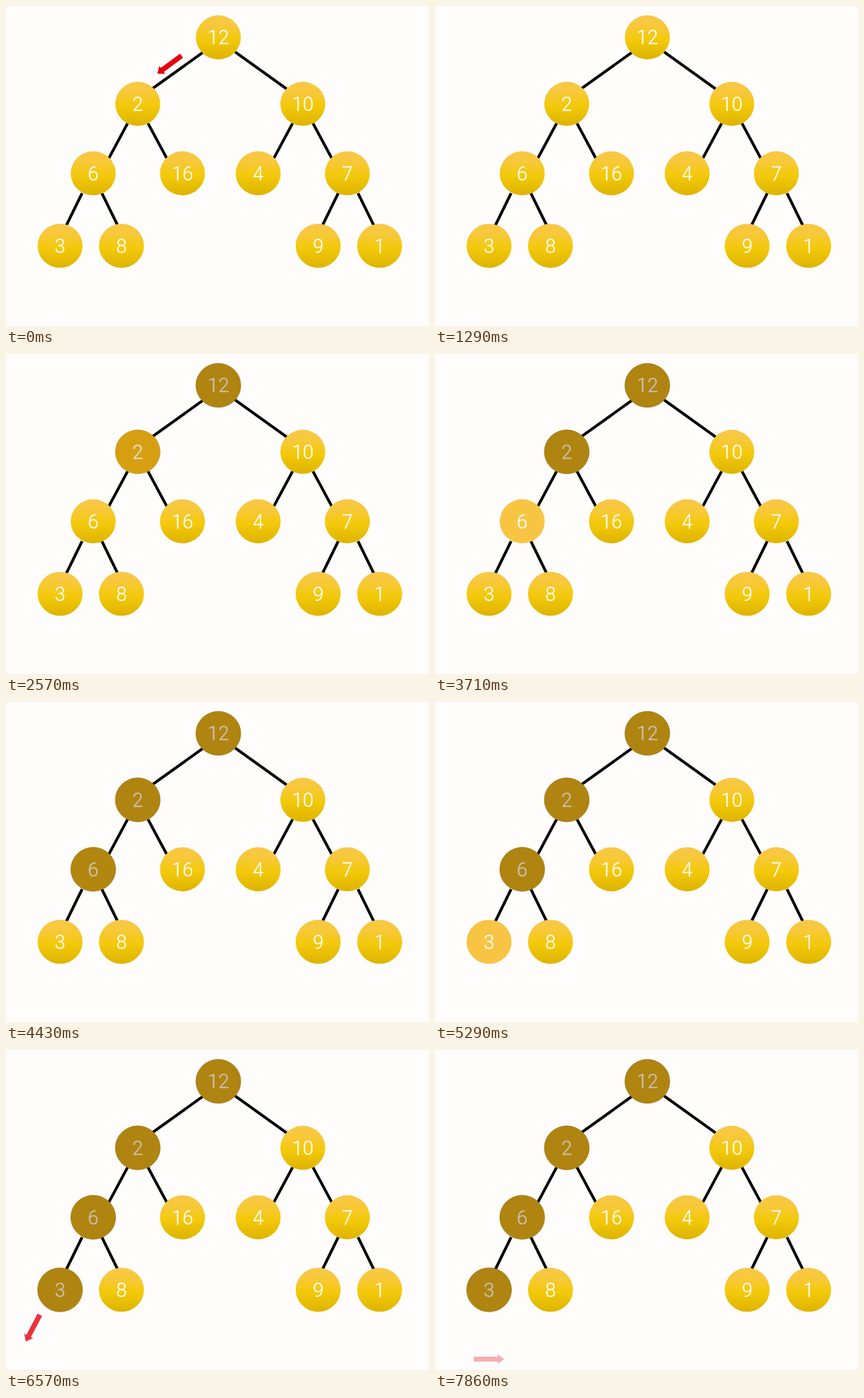
An HTML page for the animation above (8000 ms loop, 600x455 px).

```html
<!DOCTYPE html>
<html lang="en">
<head>
<meta charset="utf-8">
<title>Tree traversal</title>
<style>
  html, body { margin: 0; width: 100%; height: 100%; overflow: hidden; background: #fefdfc; }
  svg { display: block; width: 100vw; height: 100vh; }
  text { font: 300 27.5px Roboto, "Open Sans", sans-serif; text-anchor: middle; stroke-width: .3; }
  line { stroke: #000; stroke-width: 4; }
</style>
</head>
<body>
<svg viewBox="0 0 600 455">
  <defs>
    <linearGradient id="gold" x1="0" y1="0" x2="0" y2="1">
      <stop offset="0" stop-color="#f8c747"/>
      <stop offset=".25" stop-color="#f7c838"/>
      <stop offset=".55" stop-color="#f3c90a"/>
      <stop offset="1" stop-color="#deb300"/>
    </linearGradient>
  </defs>
  <g id="edges"></g>
  <g id="discs"></g>
  <g id="arrows" fill="#e6000f"></g>
</svg>
<script>
const LOOP = 8000, STEP = 1000 / 7;
const VISIT_FADE = 750, ARROW_FADE = 400;
const VISITS = [1460, 2195, 3710, 5280]; // by depth, down the left side
const DISC_KEYS = [[248, 197, 68], [214, 159, 18], [176, 132, 16]];
const TEXT_KEYS = [[255, 255, 255], [204, 198, 188]];

const node = (label, x, ...kids) => ({ label, x, kids });
const tree = node(12, 301.2,
  node(2, 186.9,
    node(6, 123.7, node(3, 76.7), node(8, 163.8)),
    node(16, 250.3)),
  node(10, 421,
    node(4, 357.7),
    node(7, 484.2, node(9, 442.8), node(1, 530))));

// Where the two edges below each level leave the parent and meet the child.
const FORKS = [
  { fromX: 22.5, fromY: 20.8, toX: 95.5, toY: 21.3 },
  { fromX: 14.5, fromY: 27.8, toX: 41, toY: 21.5 },
  { fromX: 14, fromY: 28.3, toX: 36.5, toY: 28.8 }
];

const arrows = [
  { x: 249, y: 70.6, angle: 143.2, show: -ARROW_FADE, hide: 300 },
  { x: 48, y: 376.5, angle: 117.8, show: 6250, hide: 7000 },
  { x: 55, y: 439.5, angle: 0, show: 7730, hide: LOOP }
];

const levelY = depth => 44.6 + 92.4 * depth + 2.13 * depth ** 2;
const ramp = (t, start, length) => Math.max(0, Math.min(1, (t - start) / length));

function set(el, attrs) {
  for (const key in attrs) el.setAttribute(key, attrs[key]);
}

function add(layer, tag, attrs) {
  const el = document.createElementNS('http://www.w3.org/2000/svg', tag);
  set(el, attrs);
  return document.getElementById(layer).appendChild(el);
}

function blend(keys, k) {
  const pos = k * (keys.length - 1);
  const i = Math.min(Math.floor(pos), keys.length - 2);
  return `rgb(${keys[i].map((v, c) => Math.round(v + (keys[i + 1][c] - v) * (pos - i)))})`;
}

const visited = [];

function build({ label, x, kids }, depth, onPath) {
  const y = levelY(depth);
  if (kids.length) {
    const [left, right] = kids;
    const hub = (x + (left.x + right.x) / 2) / 2;
    const fork = FORKS[depth];
    kids.forEach((kid, i) => {
      const side = i ? 1 : -1;
      add('edges', 'line', {
        x1: hub + side * fork.fromX, y1: y + fork.fromY,
        x2: hub + side * fork.toX, y2: levelY(depth + 1) - fork.toY
      });
      build(kid, depth + 1, onPath && i === 0);
    });
  }
  const disc = add('discs', 'ellipse', { cx: x, cy: y, rx: 31.9, ry: 31.3, fill: 'url(#gold)' });
  const text = add('discs', 'text', { x, y: y + 9.6, fill: '#fff', stroke: '#fff' });
  text.textContent = label;
  if (onPath) visited.push({ disc, text, start: VISITS[depth] });
}

build(tree, 0, true);

for (const arrow of arrows) {
  arrow.el = add('arrows', 'path', {
    d: 'M0-3.6H34V-7L43 0L34 7V3.6H0Z',
    transform: `translate(${arrow.x} ${arrow.y}) rotate(${arrow.angle})`
  });
}

function draw(t) {
  for (const { disc, text, start } of visited) {
    const k = ramp(t, start, VISIT_FADE);
    const ink = blend(TEXT_KEYS, k);
    set(disc, {
      fill: t < start ? 'url(#gold)' : blend(DISC_KEYS, k),
      stroke: '#96700c', 'stroke-width': 0.6, 'stroke-opacity': k
    });
    set(text, { fill: ink, stroke: ink });
  }
  for (const { el, show, hide } of arrows) {
    set(el, { opacity: ramp(t, show, ARROW_FADE) * (1 - ramp(t, hide, ARROW_FADE)) });
  }
}

const origin = performance.now();
function tick() {
  const t = Math.max(0, performance.now() - origin) % LOOP;
  draw(Math.floor((t + 4) / STEP) * STEP % LOOP);
  requestAnimationFrame(tick);
}
tick();
</script>
</body>
</html>
```
